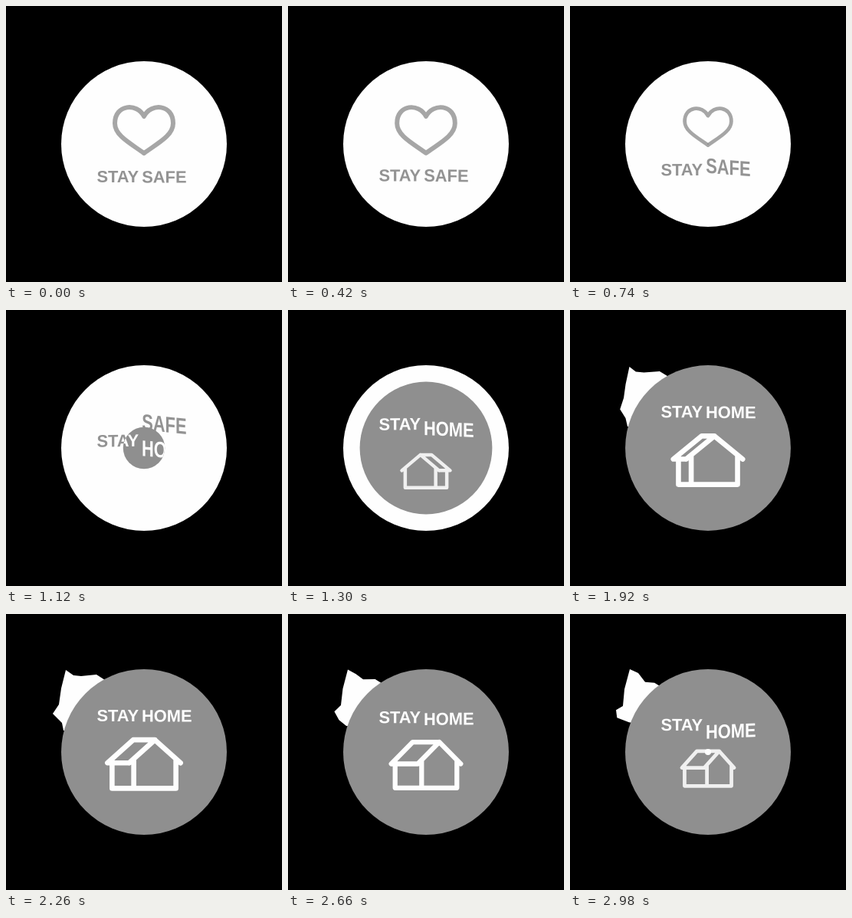
These frames come from a looping animation (360 by 360 pixels, 3 s). An HTML page with a canvas:

```html
<!DOCTYPE html>
<html>
<head>
<meta charset="utf-8">
<style>
  html, body { margin: 0; width: 100%; height: 100%; overflow: hidden; background: #000; }
  canvas { display: block; }
</style>
</head>
<body>
<canvas id="stage" width="360" height="360"></canvas>
<script>
const ctx = document.getElementById('stage').getContext('2d');
const LOOP = 3000, MID = 180, RADIUS = 108;
const GREY = '#8f8f8f', TEXT_GREY = '#939393', HEART_GREY = '#a6a6a6', WHITE = '#fefefe';

// Exponential ease in and out, halfway at `mid`; `half` is the halving time.
function ease(t, mid, half) {
  const tail = 0.5 * 2 ** (-Math.abs(t - mid) / half);
  return t < mid ? tail : 1 - tail;
}
const pace = p => Math.min(p, 1 - p);

function disc(r, color) {
  if (r < 0.4) return;
  ctx.fillStyle = color;
  ctx.beginPath();
  ctx.arc(MID, MID, r, 0, 7);
  ctx.fill();
}

// A word rides from the lower line to the upper one, leaning and stretching with its speed.
function word(text, x, color, rise, fall, lean, stretch) {
  const inPace = pace(rise), outPace = pace(fall);
  ctx.save();
  ctx.translate(x + 28, 223 - 91.5 * (rise - fall));
  ctx.transform(1, lean * (inPace - outPace), 0, 1 + stretch * (inPace + outPace), 0, 0);
  ctx.fillStyle = color;
  ctx.fillText(text, -28, 7.7);
  ctx.restore();
}

function stay(t, color) {
  word('STAY', 118.4, color, ease(t, 1085, 153), ease(t, 3265, 155), -0.05, 0.05);
}

function heart(t) {
  const shrink = ease(t, 820, 60), s = 1 - shrink;
  if (s < 0.03) return;
  ctx.save();
  ctx.translate(MID, 162 - 22 * shrink);
  ctx.scale(s, s);
  ctx.strokeStyle = HEART_GREY;
  ctx.lineWidth = 6;
  ctx.beginPath();
  ctx.moveTo(0, -18);
  ctx.bezierCurveTo(-9, -36, -38, -34, -38, -9);
  ctx.bezierCurveTo(-38, 7, -18, 17, 0, 30);
  ctx.bezierCurveTo(18, 17, 38, 7, 38, -9);
  ctx.bezierCurveTo(38, -34, 9, -36, 0, -18);
  ctx.closePath();
  ctx.stroke();
  ctx.restore();
}

// A house turning about its vertical axis; only the near side is drawn.
function house(t) {
  const small = 1 - ease(t, 1226, 125), leave = ease(t, 3098, 150);
  const s = 1 - small - leave;
  if (s < 0.03) return;
  const turn = (59 - 81 * Math.exp((1300 - t) / 950)) * Math.PI / 180;
  const c = Math.cos(turn), sn = Math.sin(turn), side = turn > 0 ? -1 : 1;
  const wall = 32, eave = 39, front = -29, back = 29;
  const floorY = 32, eaveY = -1.5, wallY = -6, topY = -32;
  const line = (...points) => points.forEach(([u, y, d], i) =>
    ctx[i ? 'lineTo' : 'moveTo'](u * c - d * sn, y));

  ctx.save();
  ctx.translate(MID, 195.5 + 45 * small + 21 * leave);
  ctx.scale(s, s);
  ctx.strokeStyle = s < 0.8 ? '#f0f0f0' : WHITE;
  ctx.lineWidth = 6.7;
  ctx.beginPath();
  line([-wall, wallY, front], [-wall, floorY, front], [wall, floorY, front], [wall, wallY, front]);
  line([-eave, eaveY, front], [0, topY, front], [eave, eaveY, front]);
  line([0, topY, front], [0, topY, back], [side * eave, eaveY, back], [side * eave, eaveY, front]);
  line([side * wall, wallY, back], [side * wall, floorY, back], [side * wall, floorY, front]);
  ctx.stroke();
  ctx.restore();
}

// Ragged white patch that creeps out behind the disc.
const patchTimes = [1300, 1620, 2260, 3000];
const patch = [
  Array.from({ length: 20 }, () => 125),
  [75,152, 72,140, 69,129, 71,112, 73,97, 77,75, 84,81, 95,82, 116,81, 130,89],
  [75,152, 73,142, 61,130, 69,118, 72,97, 78,73, 88,80, 98,81, 118,79, 132,88],
  [77,141, 61,135, 60,125, 69,120, 71,98, 78,72, 89,77, 98,89, 110,90, 118,95]
];

function drawPatch(t) {
  if (t < patchTimes[0]) return;
  let i = 0;
  while (i < 2 && t >= patchTimes[i + 1]) i++;
  const k = (t - patchTimes[i]) / (patchTimes[i + 1] - patchTimes[i]);
  const at = n => patch[i][n] + (patch[i + 1][n] - patch[i][n]) * k;
  ctx.fillStyle = WHITE;
  ctx.beginPath();
  for (let n = 0; n < 20; n += 2) ctx.lineTo(at(n), at(n + 1));
  ctx.lineTo(130, 150);
  ctx.fill();
}

function draw(t) {
  ctx.clearRect(0, 0, 360, 360);
  ctx.font = 'bold 21.9px "Liberation Sans", Arial, sans-serif';
  ctx.lineJoin = ctx.lineCap = 'round';

  drawPatch(t);
  const cover = RADIUS * ease(t, 1198, 78);
  if (cover < RADIUS - 2) {
    disc(RADIUS, WHITE);
    heart(t);
    stay(t, TEXT_GREY);
    word('SAFE', 177.2, TEXT_GREY, ease(t, 955, 117), 0, 0.55, 1.8);
  }

  disc(cover, GREY);
  ctx.save();
  ctx.beginPath();
  ctx.arc(MID, MID, cover, 0, 7);
  ctx.clip();
  stay(t, WHITE);
  word('HOME', 177, WHITE, ease(t, 1147, 160), ease(t, 3154, 155), 0.18, 0.75);
  house(t);
  ctx.restore();

  disc(RADIUS * ease(t, 3273, 78), WHITE);
}

const start = performance.now();
function tick() {
  draw((performance.now() - start) % LOOP);
  requestAnimationFrame(tick);
}
tick();
</script>
</body>
</html>
```
